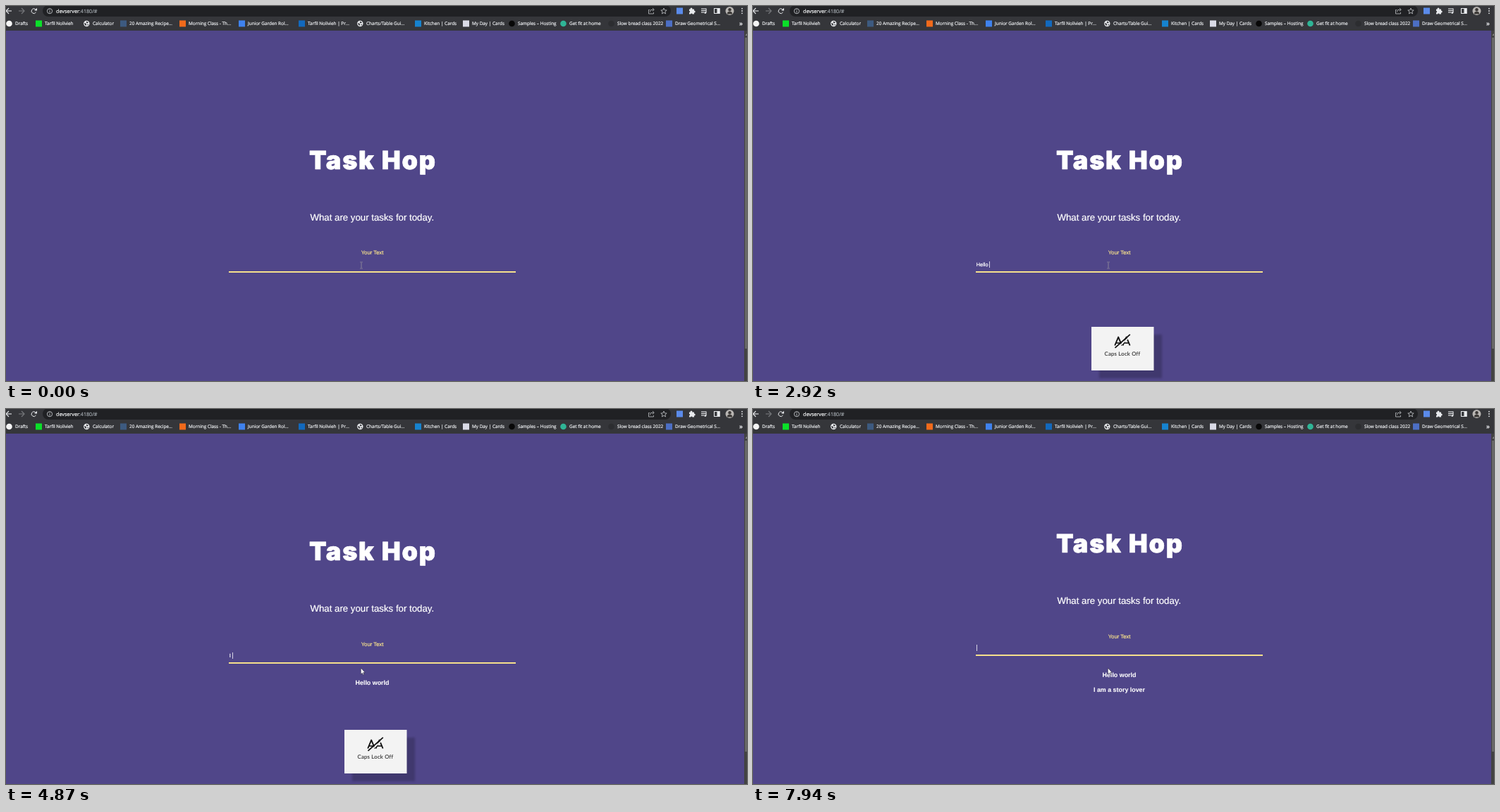
An HTML page with a canvas that plays this animation: 1051x533 px, repeating every 8000 ms.

```html
<!DOCTYPE html>
<html lang="en">
<head>
<meta charset="utf-8">
<title>Task list</title>
<style>
html, body { margin: 0; width: 100%; height: 100%; overflow: hidden; background: #504689; }
canvas { display: block; width: 1051px; height: 533px; }
</style>
</head>
<body>
<canvas id="stage" width="1051" height="533"></canvas>
<script>
const ctx = document.getElementById('stage').getContext('2d');
const LOOP = 8000;
const SANS = '"Liberation Sans", Arial, sans-serif';
const UI = '"Open Sans", "Noto Sans", sans-serif';
const YELLOW = '#f6e08c';
const LIGHT = '#e8eaed';
const INPUT_FONT = `7.33px ${SANS}`;

// [time, field content]
const typed = [
  [0, ''], [150, 'H'], [300, 'HE'], [550, 'HEL'], [800, 'HELL'], [920, 'HEL'],
  [1170, 'HE'], [1290, 'HEL'], [1570, 'HE'], [1690, 'H'],
  [2090, 'He'], [2390, 'Hel'], [2640, 'Hell'], [2920, 'Hello '],
  [3170, 'Hello w'], [3290, 'Hello wor'], [3420, 'Hello worl'], [3540, 'Hello world'], [3670, ''],
  [4750, 'I'], [4870, 'I '], [5020, 'I a'], [5150, 'I am'], [5290, 'I am '], [5430, 'I am a'], [5560, 'I am a '],
  [5860, 'I am a s'], [6000, 'I am a st'], [6140, 'I am a sto'], [6290, 'I am a stor'], [6430, 'I am a story'],
  [6710, 'I am a story '], [6950, 'I am a story l'], [7240, 'I am a story lo'],
  [7390, 'I am a story love'], [7690, 'I am a story lover'], [7940, '']
];
const todos = [[3670, 'Hello world'], [7940, 'I am a story lover']];
const shifts = [0, -16.6, -27.6];
const popups = [[150, 2090, true], [2090, 3920, false], [4750, 6950, false]];
const caretOff = [[0, 150], [4170, 4750]];

// [icon x, icon kind, icon colour, caption]
const bookmarks = [
  [0, 'dot', '#f5f5f5', 'Drafts'],
  [42, 'box', '#0be029', 'Tarfil Nolivieh'],
  [110, 'globe', LIGHT, 'Calculator'],
  [162, 'box', '#3d5a80', '20 Amazing Recipe...'],
  [246, 'box', '#f26a1b', 'Morning Class - Th...'],
  [330, 'box', '#3f82ee', 'Junior Garden Rol...'],
  [415, 'box', '#1269bd', 'Tarfil Nolivieh | Pr...'],
  [498, 'globe', LIGHT, 'Charts/Table Gui...'],
  [580, 'box', '#1683cf', 'Kitchen | Cards'],
  [648, 'box', '#d9dae6', 'My Day | Cards'],
  [713, 'dot', '#080808', 'Samples – Hosting'],
  [786, 'dot', '#2fb596', 'Get fit at home'],
  [854, 'dot', '#2c2d30', 'Slow bread class 2022'],
  [936, 'box', '#4c6fc4', 'Draw Geometrical S...']
];

const inside = t => ([from, to]) => t >= from && t < to;

function rect(x, y, w, h, color) {
  ctx.fillStyle = color;
  ctx.fillRect(x, y, w, h);
}

function disc(x, y, r, color) {
  ctx.fillStyle = color;
  ctx.beginPath();
  ctx.arc(x, y, r, 0, Math.PI * 2);
  ctx.fill();
}

function ring(x, y, r, color, from = 0, to = Math.PI * 2) {
  ctx.strokeStyle = color;
  ctx.lineWidth = 1;
  ctx.beginPath();
  ctx.arc(x, y, r, from, to);
  ctx.stroke();
}

function line(points, color, width = 1) {
  ctx.strokeStyle = color;
  ctx.lineWidth = width;
  ctx.beginPath();
  points.forEach(([x, y]) => ctx.lineTo(x, y));
  ctx.stroke();
}

function poly(points, color) {
  ctx.fillStyle = color;
  ctx.beginPath();
  points.forEach(([x, y]) => ctx.lineTo(x, y));
  ctx.closePath();
  ctx.fill();
}

// A hairline outline gives small type its firmer weight.
function text(str, x, y, font, color, { align = 'left', spacing = 0, weight = 0.22 } = {}) {
  ctx.font = font;
  ctx.fillStyle = ctx.strokeStyle = color;
  ctx.lineWidth = weight;
  ctx.textAlign = align;
  ctx.letterSpacing = spacing + 'px';
  ctx.fillText(str, x, y);
  ctx.strokeText(str, x, y);
  const width = ctx.measureText(str).width;
  ctx.letterSpacing = '0px';
  return width;
}

function star(x, y, r) {
  const points = Array.from({ length: 11 }, (_, i) => {
    const a = i * Math.PI / 5 - Math.PI / 2;
    const d = i % 2 ? r * 0.45 : r;
    return [x + d * Math.cos(a), y + d * Math.sin(a)];
  });
  line(points, '#c4c7cb', 0.8);
}

function globe(x, y) {
  disc(x, y, 4.2, LIGHT);
  poly([[x - 3.4, y - 1], [x - 0.5, y], [x - 0.5, y + 3.3], [x - 2.4, y + 1.7]], '#35363a');
  poly([[x, y - 3.2], [x + 2.6, y - 1.8], [x + 1.2, y - 0.2], [x - 0.6, y - 1.4]], '#35363a');
  poly([[x + 1, y + 1], [x + 3, y + 1], [x + 1.4, y + 3]], '#35363a');
}

function arrow(x, y, dir, color) {
  line([[x - 4 * dir, y], [x + 4 * dir, y]], color, 1.1);
  line([[x, y - 4], [x + 4 * dir, y], [x, y + 4]], color, 1.1);
}

function addressRow() {
  ctx.fillStyle = '#202124';
  ctx.beginPath();
  ctx.roundRect(52, -1, 891, 16, 8);
  ctx.fill();
  arrow(4, 7, -1, LIGHT);
  arrow(22, 7, 1, '#77797d');
  ring(39.5, 7.2, 3.4, LIGHT, 0.5, 5.6);
  poly([[44, 2.8], [44, 6.6], [40.2, 6.6]], LIGHT);
  ring(62, 7.2, 3.6, '#b4b7bb');
  rect(61.5, 6.6, 1, 2.8, '#b4b7bb');
  rect(61.5, 4.8, 1, 1, '#b4b7bb');
  const host = text('devserver', 71, 9.8, `7.2px ${UI}`, '#f1f3f4');
  text(':4180/#', 71 + host, 9.8, `7.2px ${UI}`, '#9aa0a6');

  line([[913, 5.5], [911.5, 5.5], [911.5, 11], [918.5, 11], [918.5, 9]], '#aeb1b5', 0.9);
  line([[913.5, 8.5], [914.5, 5.5], [919, 5.2]], '#aeb1b5', 0.9);
  line([[917, 3], [919.3, 5.2], [917, 7.4]], '#aeb1b5', 0.9);
  star(933, 7.4, 4.4);

  rect(951, 2.5, 9, 9, '#5b8bea');
  rect(969, 4.5, 7, 7, LIGHT);
  disc(972, 4, 1.5, LIGHT);
  disc(976.2, 8, 1.5, LIGHT);
  disc(969, 8.2, 1.1, '#35363a');
  disc(972.3, 11.5, 1.1, '#35363a');
  [3.5, 6, 8.5].forEach((y, i) => rect(986, y, i < 2 ? 7 : 4, 1.1, LIGHT));
  rect(992.6, 3.5, 1, 6, LIGHT);
  disc(991.8, 9.6, 1.4, LIGHT);
  line([[1004.5, 3.5], [1012, 3.5], [1012, 10.5], [1004.5, 10.5], [1004.5, 3]], LIGHT, 1.1);
  rect(1008.5, 3, 4, 8, LIGHT);
  disc(1026.5, 7, 6, '#b9b6b3');
  disc(1026.5, 5.2, 2.2, '#3b3836');
  ctx.fillStyle = '#3b3836';
  ctx.beginPath();
  ctx.arc(1026.5, 11.5, 3.7, Math.PI, 0);
  ctx.fill();
  [3.7, 7, 10.3].forEach(y => disc(1044, y, 0.9, LIGHT));
}

function browserBar() {
  rect(0, 0, 1051, 35, '#35363a');
  addressRow();
  for (const [x, kind, color, caption] of bookmarks) {
    if (kind === 'box') rect(x, 20.5, 9, 9, color);
    else if (kind === 'dot') disc(x + 4.5, 25, 4.3, color);
    else globe(x + 4.3, 25);
    text(caption, x + 13, 27.2, `6.4px ${UI}`, LIGHT);
  }
  text('»', 1040, 27.6, `600 9px ${UI}`, LIGHT);
}

function scrollbar() {
  rect(1047, 35, 4, 498, '#424242');
  rect(1048, 45, 3, 442, '#686868');
  poly([[1048.5, 42], [1051, 39], [1051, 42]], '#8a8a8a');
}

function popup(capsOn) {
  ctx.save();
  ctx.shadowColor = 'rgba(0,0,0,0.2)';
  ctx.shadowOffsetX = ctx.shadowOffsetY = 11;
  ctx.shadowBlur = 3;
  rect(480, 456, 88.5, 62, '#f3f3f3');
  ctx.restore();
  for (const x of [513.2, 524.6]) {
    line([[x, 482.5], [x + 5, 470.6], [x + 10, 482.5]], '#111', 1.9);
    line([[x + 1.8, 479], [x + 8.2, 479]], '#111', 1.6);
  }
  if (!capsOn) {
    line([[515, 487.4], [536.4, 468.4]], '#f3f3f3', 1.6);
    line([[513.5, 485.8], [534.8, 466.8]], '#111', 1.8);
  }
  text(capsOn ? 'Caps Lock On' : 'Caps Lock Off', 524, 497, '7.7px Lato, sans-serif', '#2b2b2b',
    { align: 'center', spacing: 0.25, weight: 0.1 });
}

function mouse(overField) {
  if (overField) {
    line([[504, 364.5], [504, 372.5]], '#8a8498');
    line([[502, 364], [506, 364]], '#8a8498', 0.8);
    line([[502, 373], [506, 373]], '#8a8498', 0.8);
    return;
  }
  const tip = [[503.3, 368], [503.3, 377], [505.3, 375.2], [506.6, 378], [507.9, 377.4], [506.7, 374.7], [509.2, 374.5]];
  poly(tip, '#fff');
  line([...tip, tip[0]], '#2a2540', 0.6);
}

function draw(t) {
  const done = todos.filter(([at]) => t >= at);
  const dy = shifts[done.length];
  const content = typed.findLast(([at]) => t >= at)[1];
  const note = popups.find(inside(t));
  const align = 'center';

  rect(0, 0, 1051, 533, '#504689');
  browserBar();
  scrollbar();

  text('Task Hop', 520.4, 232 + dy, '900 36px Inter, sans-serif', '#fff', { align, spacing: 1.8, weight: 0.7 });
  text('What are your tasks for today.', 519.3, 304.5 + dy, `13.25px ${SANS}`, '#fff', { align });
  text('Your Text', 519.5, 353.2 + dy, `7.7px ${SANS}`, YELLOW, { align });
  rect(316, Math.round(377 + dy), 407, 2, YELLOW);

  const width = text(content, 316.8, 370 + dy, INPUT_FONT, '#fff');
  if (!caretOff.some(inside(t))) {
    rect(Math.floor(317 + width), Math.round(363 + dy), 1, 9, '#d8d5e6');
  }

  done.forEach(([, item], i) => {
    text(item, 519.5, 408.2 + dy + i * 21.7, `bold 8.9px ${SANS}`, '#fff', { align, weight: 0.1 });
  });
  if (note) popup(note[2]);
  mouse(!done.length);
}

ctx.textRendering = 'geometricPrecision';
ctx.lineJoin = 'round';
const start = performance.now();
function tick() {
  draw((performance.now() - start) % LOOP);
  requestAnimationFrame(tick);
}
tick();
</script>
</body>
</html>
```
